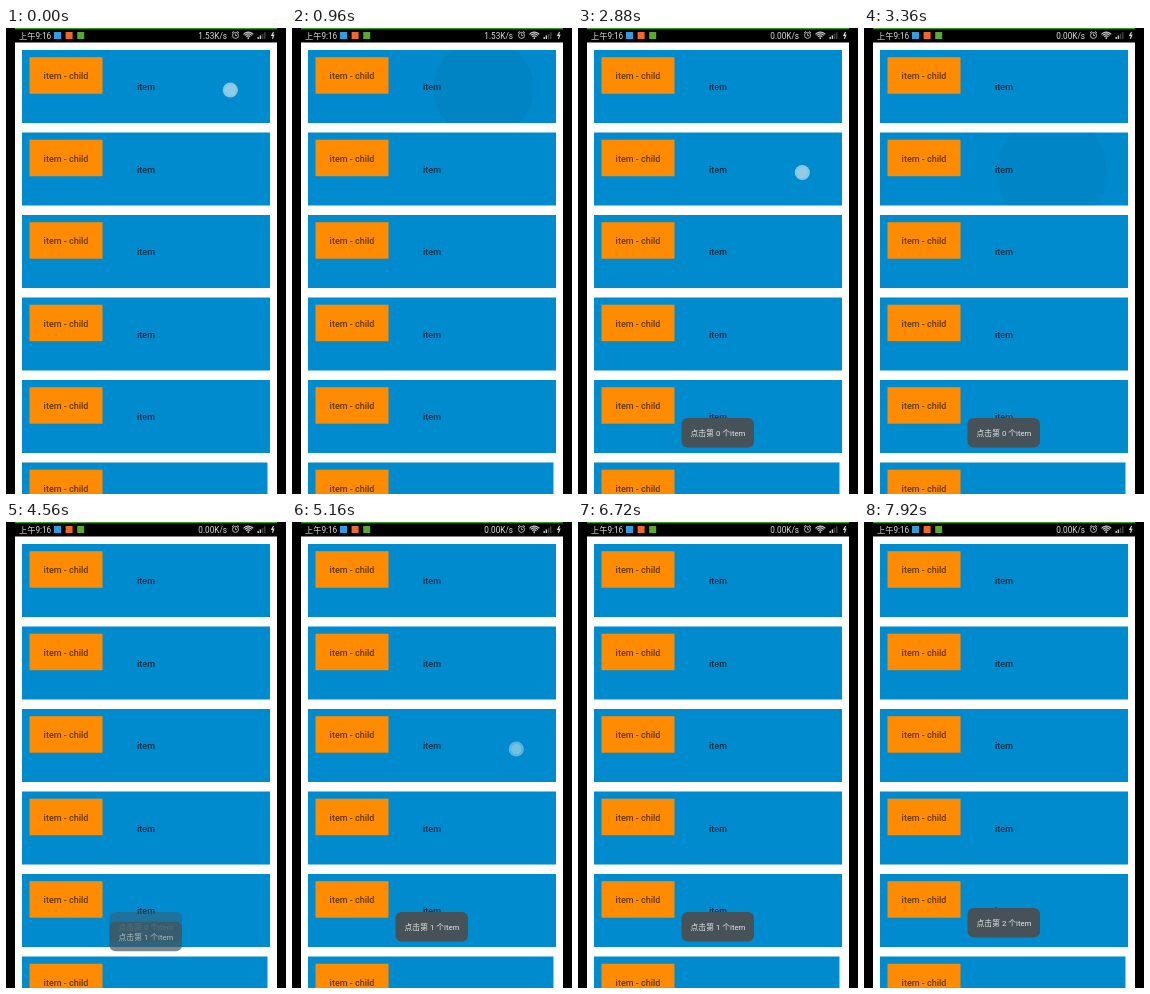
These frames come from a looping animation (280 by 466 pixels, 8 s). An HTML page with a canvas:

```html
<!DOCTYPE html>
<html lang="zh">
<meta charset="utf-8">
<style>
html, body { margin: 0; width: 100%; height: 100%; overflow: hidden; background: #000; }
canvas { display: block; }
</style>
<canvas id="stage" width="280" height="466"></canvas>
<script>
const g = document.getElementById('stage').getContext('2d');
const LOOP = 8000, STEP = 120, PITCH = 82.5;
const FONT = 'Roboto, "Noto Sans CJK SC", "Noto Sans CJK", sans-serif';
const taps = [
  { show: -400, release: 600 },
  { show: 2520, release: 2960 },
  { show: 5040, release: 5400 }
];
const toasts = [1080, 4200, 7320];

const clamp = v => Math.max(0, Math.min(1, v));

function rect(x, y, w, h, color) {
  g.fillStyle = color;
  g.fillRect(x, y, w, h);
}

function disc(x, y, r, color) {
  g.fillStyle = color;
  g.beginPath();
  g.arc(x, y, r, 0, Math.PI * 2);
  g.fill();
}

function text(str, x, y, size, color, align = 'center', weight = 400) {
  g.font = `${weight} ${size}px ${FONT}`;
  g.textAlign = align;
  g.fillStyle = color;
  g.fillText(str, x, y);
}

function line(points, color, width) {
  g.strokeStyle = color;
  g.lineWidth = width;
  g.beginPath();
  points.forEach(([x, y]) => g.lineTo(x, y));
  g.stroke();
}

function arc(x, y, r, from, to) {
  g.beginPath();
  g.arc(x, y, r, from, to);
  g.stroke();
}

function statusBar(t) {
  rect(9, 0, 262, 1.3, '#3f9c16');
  text('上午9:16', 13, 10.6, 8.2, '#ddd', 'left');
  ['#2d9fe0', '#f0682c', '#5aaa32'].forEach((c, i) => rect(48 + i * 11.6, 4, 7, 7, c));
  text(t < 2520 ? '1.53K/s' : '0.00K/s', 221, 10.6, 8.2, '#ddd', 'right');

  // Alarm clock
  g.strokeStyle = '#ccc';
  g.lineWidth = 0.9;
  arc(229.5, 7.4, 3, 0, Math.PI * 2);
  line([[229.5, 5.6], [229.5, 7.6], [231, 7.6]], '#ccc', 0.8);
  line([[226, 4.8], [227.8, 3.4]], '#ccc', 0.9);
  line([[231.2, 3.4], [233, 4.8]], '#ccc', 0.9);

  // Wifi, signal, charging
  g.lineWidth = 1.1;
  for (const r of [2.7, 4.7, 6.5]) arc(242.3, 10.6, r, -Math.PI * 0.77, -Math.PI * 0.23);
  disc(242.3, 10.2, 0.9, '#ccc');
  for (let i = 0; i < 4; i++) {
    rect(251.5 + i * 2.2, 9 - i * 1.6, 1.4, 2 + i * 1.6, i < 2 ? '#ccc' : '#444');
  }
  line([[267.6, 4], [265.8, 7.4], [267.8, 7.2], [266.4, 10.8]], '#ddd', 1.1);
}

function ripple(y, dt) {
  if (dt < 0 || dt > 1100) return;
  const p = clamp(dt / 930);
  const alpha = 0.1 * Math.min(1, Math.exp((240 - dt) / 150));
  g.save();
  g.beginPath();
  g.rect(16, y, 248, 73);
  g.clip();
  rect(16, y, 248, 73, `rgba(0,0,0,${alpha * 0.15})`);
  disc(224 - 84 * p, y + 40 - 3.5 * p, 129 * p, `rgba(0,0,0,${alpha})`);
  g.restore();
}

function card(i, t) {
  const y = 22 + i * PITCH;
  rect(16, y, i < 5 ? 248 : 245.5, 73, '#008bcf');
  if (taps[i]) ripple(y, t - taps[i].release);
  rect(23.5, y + 7.2, 73, 36.5, '#ff8c00');
  text('item - child', 60, y + 29, 9, 'rgba(0,0,0,.62)', 'center', 500);
  text('item', 140, y + 40, 9, 'rgba(0,0,0,.66)', 'center', 500);
}

function pointer(tap, i, t) {
  const a = clamp((t - tap.show + STEP) / 360) * clamp(1 - (t - tap.release) / 360);
  if (!a) return;
  const y = 62 + i * PITCH;
  g.globalAlpha = a;
  disc(224.3, y, 7.6, 'rgba(165,215,238,.8)');
  disc(224.3, y, 5.2, 'rgba(150,205,228,.7)');
  g.globalAlpha = 1;
}

function toast(i, t) {
  const dt = t - toasts[i];
  const gone = t - (toasts[i + 1] ?? Infinity);
  if (dt < 0 || gone > 600) return;
  // Rises past its place, then settles
  const dy = dt <= 600 ? 20 * Math.cos(Math.PI * dt / 1060) : -4 * clamp((840 - dt) / 240);
  g.globalAlpha = clamp((dt + 30) / 570) * clamp(1 - (gone - 60) / 540);
  g.fillStyle = '#465258';
  g.beginPath();
  g.roundRect(103.5, 390 + dy, 72.5, 29.5, 6);
  g.fill();
  text(`点击第 ${i} 个item`, 140, 408 + dy, 7.8, '#e2e5e6');
  g.globalAlpha = 1;
}

function draw(now) {
  const t = Math.floor(now % LOOP / STEP) * STEP;
  rect(0, 0, 280, 466, '#000');
  rect(9, 14.5, 262, 452, '#fdfefd');
  statusBar(t);
  for (let i = 0; i < 6; i++) card(i, t);
  taps.forEach((tap, i) => pointer(tap, i, t));
  toasts.forEach((_, i) => toast(i, t));
}

let start;
function frame(now) {
  start ??= now;
  draw(now - start);
  requestAnimationFrame(frame);
}
draw(0);
requestAnimationFrame(frame);
</script>
</html>
```
